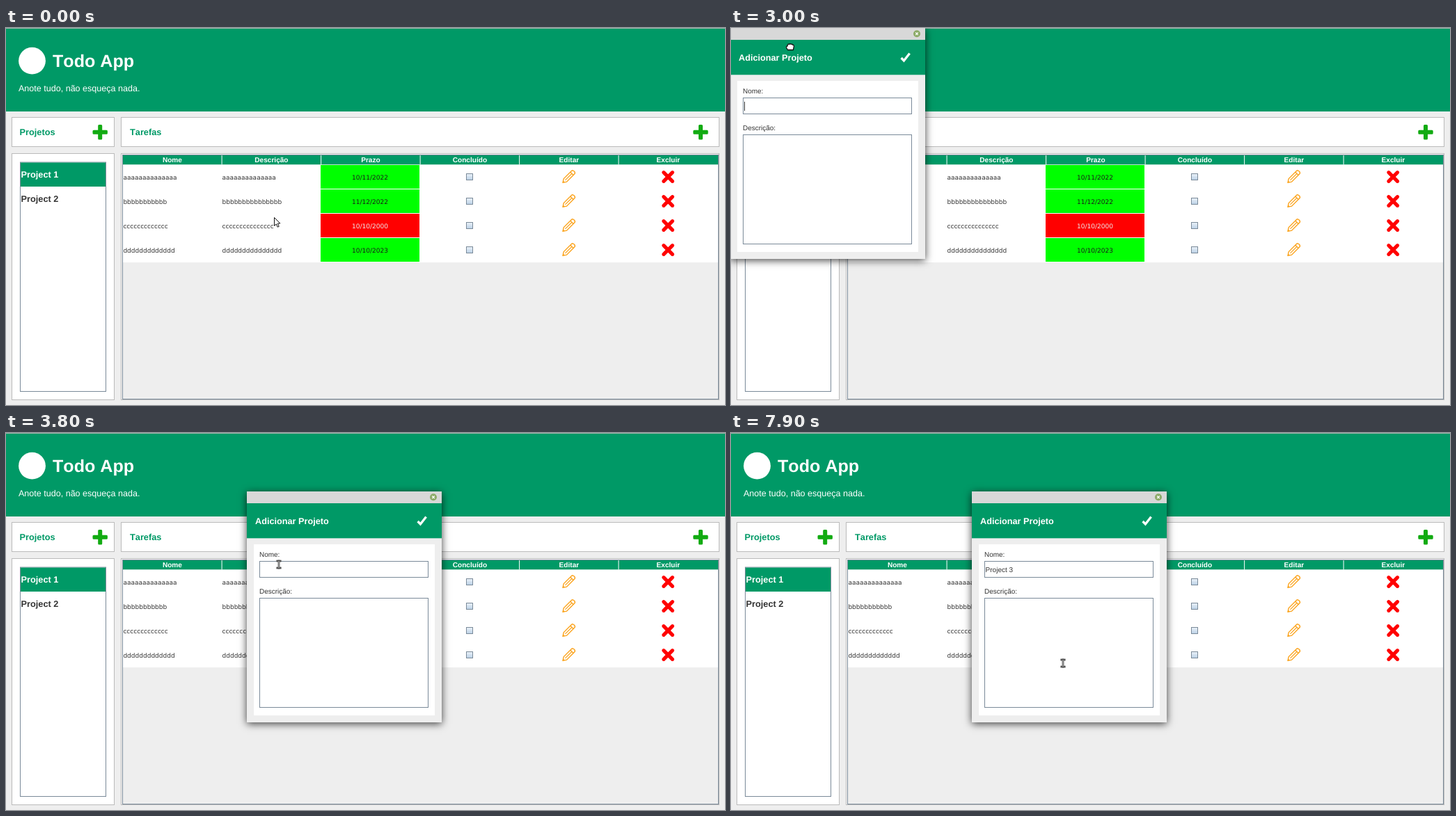
An HTML page with a canvas that plays this animation: 1033 px wide and 542 px high, repeating every 8000 ms.

```html
<!DOCTYPE html>
<html lang="pt">
<head>
<meta charset="utf-8">
<title>Todo App</title>
<style>
  html, body { margin: 0; width: 100%; height: 100%; overflow: hidden; background: #eee; }
  canvas { display: block; }
</style>
</head>
<body>
<canvas id="stage" width="1033" height="542"></canvas>
<script>
const ctx = document.getElementById('stage').getContext('2d');
const GREEN = '#009966', STEEL = '#7a8a99', DARK = '#333', LOOP = 8000, STEP = 100;
const SANS = '"Liberation Sans", Arial, sans-serif', CELL = '"DejaVu Sans", sans-serif';

function rect(x, y, w, h, color) {
  ctx.fillStyle = color;
  ctx.fillRect(x, y, w, h);
}

function box(x, y, w, h, border, fill = '#fff') {
  rect(x, y, w, h, fill);
  ctx.strokeStyle = border;
  ctx.lineWidth = 1;
  ctx.strokeRect(x + .5, y + .5, w - 1, h - 1);
}

function text(str, x, y, size, color, { bold = false, family = SANS, align = 'left' } = {}) {
  ctx.font = `${bold ? 'bold ' : ''}${size}px ${family}`;
  ctx.fillStyle = color;
  ctx.textAlign = align;
  ctx.fillText(str, x, y);
}

function line(points, width, color, cap = 'butt') {
  ctx.beginPath();
  points.forEach(([x, y]) => ctx.lineTo(x, y));
  ctx.lineWidth = width;
  ctx.strokeStyle = color;
  ctx.lineCap = cap;
  ctx.stroke();
}

function disc(x, y, r, color) {
  ctx.beginPath();
  ctx.arc(x, y, r, 0, 7);
  ctx.fillStyle = color;
  ctx.fill();
}

function at(x, y, draw) {
  ctx.save();
  ctx.translate(x, y);
  draw();
  ctx.restore();
}

function shape(path, fill, stroke, width = 1) {
  const p = new Path2D(path);
  ctx.lineWidth = width;
  ctx.fillStyle = fill;
  ctx.strokeStyle = stroke;
  ctx.fill(p);
  ctx.stroke(p);
}

// Icons, centred on the origin
function plus() {
  ctx.fillStyle = '#12ab12';
  ctx.beginPath();
  ctx.roundRect(-10.7, -3, 21.4, 6, 1.5);
  ctx.roundRect(-3, -10.7, 6, 21.4, 1.5);
  ctx.fill();
}

function cross() {
  line([[-6.3, -6.3], [6.3, 6.3]], 5.2, '#f00', 'round');
  line([[-6.3, 6.3], [6.3, -6.3]], 5.2, '#f00', 'round');
}

function pencil() {
  const orange = '#fba31c';
  ctx.rotate(-Math.PI / 4);
  shape('M-11.6 0L-7-3.1H9Q11.2-3.1 11.2 0T9 3.1H-7Z', '#fff', orange, 1.4);
  rect(6, -3, 1.4, 6, orange);
  rect(-7, -.6, 13, 1.2, orange);
  shape('M-11.6 0L-9.6-1.3V1.3Z', orange, orange, .6);
}

function checkbox() {
  const shade = ctx.createLinearGradient(0, -5, 0, 5);
  shade.addColorStop(0, '#eef4fa');
  shade.addColorStop(1, '#b8cfe5');
  box(-5, -5, 10, 10, STEEL, shade);
}

const pointers = {
  arrow: () => shape('M.5.5V12.4L3.3 9.8 5.2 14.2 7.2 13.3 5.3 9H8.9Z', '#fff', '#111'),
  beam: () => {
    const stem = [[0, -5], [0, 5]], top = [[-2.2, -5], [2.2, -5]], foot = [[-2.2, 5], [2.2, 5]];
    for (const p of [top, stem, foot]) line(p, 2.8, '#555', 'square');
    line(stem, 1, '#bbb');
  },
  fist: () => shape('M-3.5 4.5L-5.3 1.5Q-6-1-3.8-1.2V-2.5Q-2.6-4.8-1.4-3.4 0-5.2 1.2-3.5 2.8-4.6 3.6-2.7 5.5-3 5.4-.5L4.4 4.5Z', '#fff', '#111', 1.3)
};

const columns = ['Nome', 'Descrição', 'Prazo', 'Concluído', 'Editar', 'Excluir'];
const rows = [
  ['a', 14, 14, '10/11/2022'],
  ['b', 11, 15, '11/12/2022'],
  ['c', 13, 15, '10/10/2000'],
  ['d', 13, 15, '10/10/2023']
];
const colX = i => 167.6 + i * 142.5;

function drawTable() {
  box(165, 180, 860, 355, '#bbb');
  box(167, 182, 857, 352, STEEL, '#eee');
  rect(168, 183, 855, 13.5, GREEN);
  columns.forEach((name, i) => {
    if (i) rect(colX(i) - .5, 183, 1, 13.5, '#fff');
    text(name, colX(i) + 71.3, 192.5, 10.1, '#fff', { bold: true, align: 'center' });
  });
  rect(168, 196.5, 855, 140.5, '#fff');
  rows.forEach(([letter, nameLength, infoLength, date], i) => {
    const y = 197 + i * 35, mid = y + 17, late = i === 2;
    text(letter.repeat(nameLength), 168.4, mid + 3.5, 9, DARK, { family: CELL });
    text(letter.repeat(infoLength), 310.5, mid + 3.5, 9, DARK, { family: CELL });
    rect(452, y, 142, 34, late ? '#f00' : '#0f0');
    text(date, 523, mid + 3.5, 9, late ? '#eee' : '#1a1a1a', { family: CELL, align: 'center' });
    at(666, mid, checkbox);
    at(808.3, mid, pencil);
    at(951.2, mid, cross);
  });
}

function drawApp() {
  rect(0, 0, 1033, 542, '#eee');
  rect(0, 0, 1033, 120, GREEN);
  rect(0, 0, 1033, 1, '#a3b5ad');
  disc(37.5, 47.2, 19.4, '#fff');
  text('Todo App', 67, 55.5, 25.1, '#fff', { bold: true });
  text('Anote tudo, não esqueça nada.', 18, 91, 12.55, '#fff');

  box(8, 128, 148, 43, '#bbb');
  box(165, 128, 860, 43, '#bbb');
  text('Projetos', 19.5, 154, 12.75, GREEN, { bold: true });
  text('Tarefas', 178, 154, 12.75, GREEN, { bold: true });
  at(135.2, 149.8, plus);
  at(998, 149.8, plus);

  box(8, 180, 148, 355, '#bbb');
  box(20, 192.5, 124, 330.5, STEEL);
  rect(21, 193.5, 122, 34.5, GREEN);
  text('Project 1', 21.5, 215, 12.75, '#fff', { bold: true });
  text('Project 2', 21.5, 250, 12.75, DARK, { bold: true });
  drawTable();
}

function drawDialog(name, caret) {
  ctx.save();
  ctx.shadowColor = 'rgba(0,0,0,.75)';
  ctx.shadowBlur = 11;
  ctx.shadowOffsetY = 2;
  rect(0, 0, 280, 332, '#eee');
  ctx.restore();
  rect(0, 0, 280, 17, '#d8d8d8');
  disc(268, 8.3, 5, '#8cab68');
  line([[266.2, 6.5], [269.8, 10.1]], 1.3, '#fff');
  line([[266.2, 10.1], [269.8, 6.5]], 1.3, '#fff');

  rect(0, 17, 280, 50.3, GREEN);
  text('Adicionar Projeto', 12, 46.5, 12.7, '#fff', { bold: true });
  line([[245.6, 43], [249.4, 47], [257.6, 36.6]], 3.3, '#fff');

  rect(10, 76, 260, 246, '#fff');
  text('Nome:', 18, 93.5, 9.95, DARK);
  box(18, 100, 243, 24, STEEL);
  text('Descrição:', 18, 146.5, 9.95, DARK);
  box(18, 153, 243, 158, STEEL);

  text(name, 19.6, 116, 10, DARK);
  if (caret) rect(Math.round(20 + ctx.measureText(name).width), 106, 1, 13, DARK);
}

// Tracks: [time, x, y], straight lines between
const dialogPath = [[2000, -54, -42], [2900, -54, -42], [3000, -1, 0], [3200, 340, 87.5], [3300, 346, 84]];
const pointerPath = [
  [300, 385, 272], [400, 300, 277], [500, 68, 235], [1000, 68, 235], [1900, 134, 146], [2900, 134, 146],
  [3000, 85, 27], [3100, 250, 65], [3200, 372, 95], [3300, 378, 91], [3400, 378, 91],
  [3800, 392, 189], [4000, 393, 190], [4200, 393, 191], [7400, 393, 191],
  [7500, 400, 215], [7700, 462, 361], [7900, 477, 331]
];
const keys = [[4800, 'P'], [4900, 'r'], [5000, 'o'], [5700, 'je'], [5800, 'c'], [6000, 't'], [6100, ' '], [7200, '3']];
// Times at which the caret turns on or off
const caretFlips = [2000, 3500, 4000, 4600, 4800, 5500, 5700, 6800, 7200, 7700];

function position(path, t) {
  const next = path.findIndex(p => p[0] > t);
  if (next < 0) return path[path.length - 1].slice(1);
  if (next === 0) return path[0].slice(1);
  const [t0, x0, y0] = path[next - 1], [t1, x1, y1] = path[next];
  const k = (t - t0) / (t1 - t0);
  return [x0 + (x1 - x0) * k, y0 + (y1 - y0) * k];
}

function pointerKind(t) {
  if (t >= 2100 && t < 3000) return null;
  if (t >= 3000 && t < 3500) return 'fist';
  return t < 3800 ? 'arrow' : 'beam';
}

function draw(t) {
  drawApp();
  if (t >= 2000) {
    const name = keys.filter(k => k[0] <= t).map(k => k[1]).join('');
    const caret = caretFlips.filter(f => f <= t).length % 2 === 1;
    ctx.globalAlpha = Math.min(1, (t - 1900) / 300);
    at(...position(dialogPath, t), () => drawDialog(name, caret));
    ctx.globalAlpha = 1;
  }
  const kind = pointerKind(t);
  if (kind) at(...position(pointerPath, t), pointers[kind]);
}

ctx.fontKerning = 'none';
ctx.textRendering = 'geometricPrecision';
const start = performance.now();
function frame() {
  const t = (performance.now() - start) % LOOP;
  draw(Math.floor(t / STEP) * STEP);
  requestAnimationFrame(frame);
}
frame();
</script>
</body>
</html>
```
